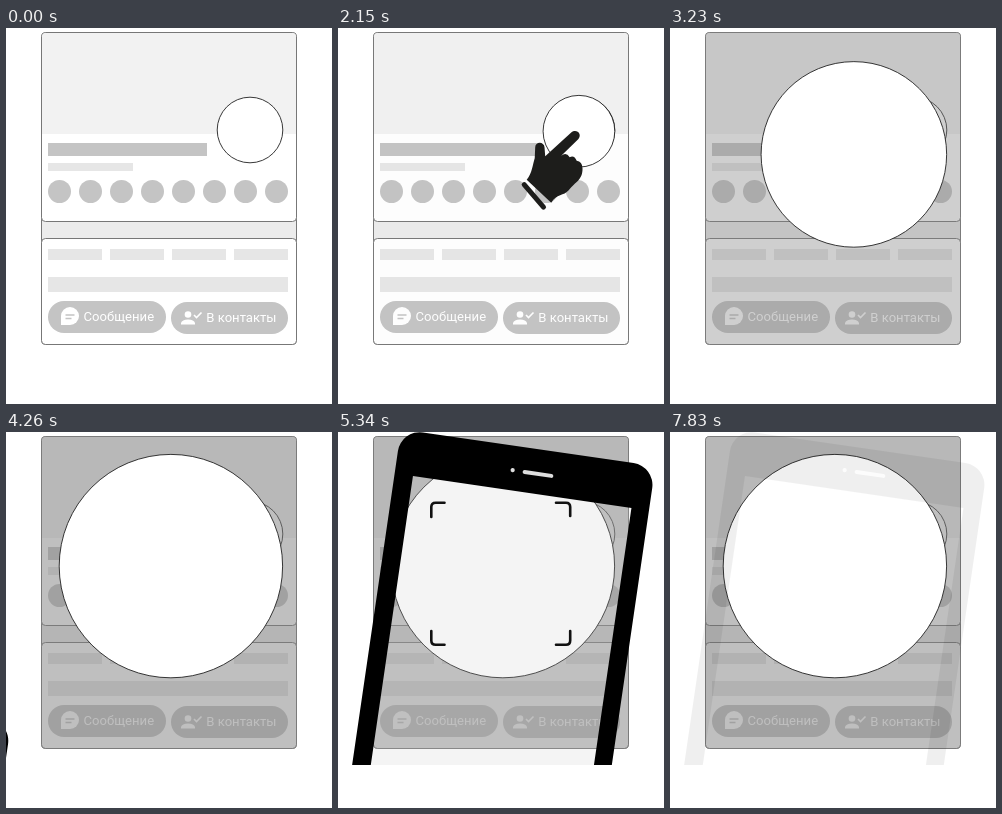
These frames come from a looping animation (326x376 px, 8000 ms). An HTML page:

```html
<!DOCTYPE html>
<html lang="ru">
<head>
<meta charset="utf-8">
<title>Card scan</title>
<style>
  html, body { margin: 0; width: 100%; height: 100%; overflow: hidden; background: #fff; }
  svg { display: block; width: 326px; height: 376px; }
  text { font: 13.1px Roboto, "Noto Sans", sans-serif; fill: #fff; }
</style>
</head>
<body>
<svg viewBox="0 0 326 376" xmlns="http://www.w3.org/2000/svg">
  <defs>
    <clipPath id="cut"><rect x="-10" y="-10" width="346" height="343"/></clipPath>
  </defs>

  <g stroke="#777" stroke-width="1">
    <rect x="35.5" y="4.5" width="255" height="312" rx="4" fill="#ececec"/>
    <rect x="35.5" y="4.5" width="255" height="189" rx="4" fill="#fff"/>
    <rect x="35.5" y="210.5" width="255" height="106" rx="4" fill="#fff"/>
  </g>
  <path d="M36 106V8.500Q36 5 39.500 5H286.500Q290 5 290 8.500V106Z" fill="#f2f2f2"/>
  <rect x="42" y="115" width="159" height="13" fill="#c4c4c4"/>
  <g id="pale" fill="#e6e6e6">
    <rect x="42" y="135" width="85" height="8"/>
    <rect x="42" y="249" width="240" height="15"/>
  </g>
  <g id="dots" fill="#c4c4c4"></g>

  <g fill="#c4c4c4">
    <rect x="42" y="273" width="118" height="32" rx="16"/>
    <rect x="165" y="274" width="117" height="32" rx="16"/>
  </g>
  <path d="M55 297V288A9 9 0 1 1 64 297Z" fill="#fff"/>
  <path d="M59.500 287H68.500M59.500 290.500H65.500" stroke="#c4c4c4" stroke-width="1.600"/>
  <text x="77.600" y="293">Сообщение</text>
  <circle cx="182" cy="286.500" r="3.300" fill="#fff"/>
  <path d="M175 296.500V295Q176 291.500 182 291.500T189 295V296.500Z" fill="#fff"/>
  <path d="M188 287L190.500 289.500L195.500 284.500" fill="none" stroke="#fff" stroke-width="1.600"/>
  <text x="200.300" y="294">В контакты</text>

  <circle cx="244" cy="102" r="32.800" fill="#fff" stroke="#222" stroke-width=".9"/>
  <rect id="shade" x="35" y="4" width="256" height="313" rx="4.500" fill="#808080"/>
  <circle id="lens" fill="#fff" stroke="#222" stroke-width=".9"/>

  <g id="hand" fill="#1d1d1b">
    <path d="M197.500 119C197.500 113 206.500 113 206.800 119L207.500 128L233.500 104.200C239 100 245 106 240.500 111L223.500 127.500
      Q228.500 123.500 232 129Q236.500 126.500 239 132.500Q244.500 133 244.800 140C245 152 238 153 231 162C226 168 219 165 213.500 174.500
      L189 151.500C194.500 145 195 136 197 130Z"/>
    <path d="M186.500 156.500L205.800 178.800" stroke="#1d1d1b" stroke-width="5" stroke-linecap="round"/>
  </g>

  <g id="phone">
    <g clip-path="url(#cut)">
      <g transform="translate(63.1 -2.8) rotate(8.3)">
        <rect x="18.500" y="44.700" width="220.800" height="400" fill="#c1c1c1" opacity=".18"/>
        <path fill-rule="evenodd" d="M0 460V22A22 22 0 0 1 22 0H235A22 22 0 0 1 257 22V460ZM18.500 460H239.300V44.700H18.500Z"/>
        <circle cx="116.300" cy="24.400" r="2.100" fill="#ddd"/>
        <path d="M128.400 24.500H155.400" stroke="#ddd" stroke-width="4" stroke-linecap="round"/>
      </g>
    </g>
    <path id="corners" fill="none" stroke="#111" stroke-width="2.600" stroke-linecap="round"
      d="M93.300 85V75Q93.300 70.700 97.600 70.700H106.500M218 70.700H228Q232.200 70.700 232.200 75V84M232.200 199V208.500Q232.200 212.700 228 212.700H218M106.500 212.700H97.600Q93.300 212.700 93.300 208.500V199"/>
  </g>
</svg>
<script>
  const LOOP = 8000;
  const el = id => document.getElementById(id);
  const set = (node, attrs) => {
    for (const key in attrs) node.setAttribute(key, attrs[key]);
  };
  const add = (parent, tag, attrs) => {
    const node = document.createElementNS("http://www.w3.org/2000/svg", tag);
    set(node, attrs);
    parent.appendChild(node);
  };
  const ramp = (t, from, to) => Math.min(1, Math.max(0, (t - from) / (to - from)));
  const mix = (a, b, p) => a + (b - a) * p;
  const shift = (x, y) => `translate(${x} ${y})`;
  const shown = on => on ? "visible" : "hidden";

  const [shade, lens, hand, phone, corners] =
    ["shade", "lens", "hand", "phone", "corners"].map(el);

  for (let i = 0; i < 8; i++) add(el("dots"), "circle", { cx: 53.5 + 31 * i, cy: 163.5, r: 11.5 });
  for (let i = 0; i < 4; i++) add(el("pale"), "rect", { x: 42 + 62 * i, y: 221, width: 54, height: 11 });

  function draw(t) {
    const grow = ramp(t, 2093, 3590);
    set(lens, {
      cx: mix(244, 164.9, grow),
      cy: mix(102, 134.1, grow),
      r: mix(32.8, 111.7, grow),
      opacity: ramp(t, 1370, 2090)
    });
    set(shade, { opacity: 0.5 * grow });

    // The hand comes in from the lower left and leaves on a flatter line.
    const away = 1 - ramp(t, 0, 900);
    const leave = ramp(t, 2150, 3050);
    set(hand, {
      transform: shift(-230 * away - 262 * leave, 260 * away + 198 * leave),
      visibility: shown(t >= 30 && leave < 1)
    });

    const far = 1 - ramp(t, 4250, 5160);
    set(phone, {
      transform: shift(-316 * far, 259 * far),
      opacity: 1 - ramp(Math.min(t, 7830), 6740, 7900),
      visibility: shown(t > 4250)
    });
    set(corners, { opacity: ramp(t, 5250, 5340) - ramp(t, 6740, 7530) });
  }

  const start = performance.now();
  function tick() {
    draw((performance.now() - start) % LOOP);
    requestAnimationFrame(tick);
  }
  draw(0);
  requestAnimationFrame(tick);
</script>
</body>
</html>
```
